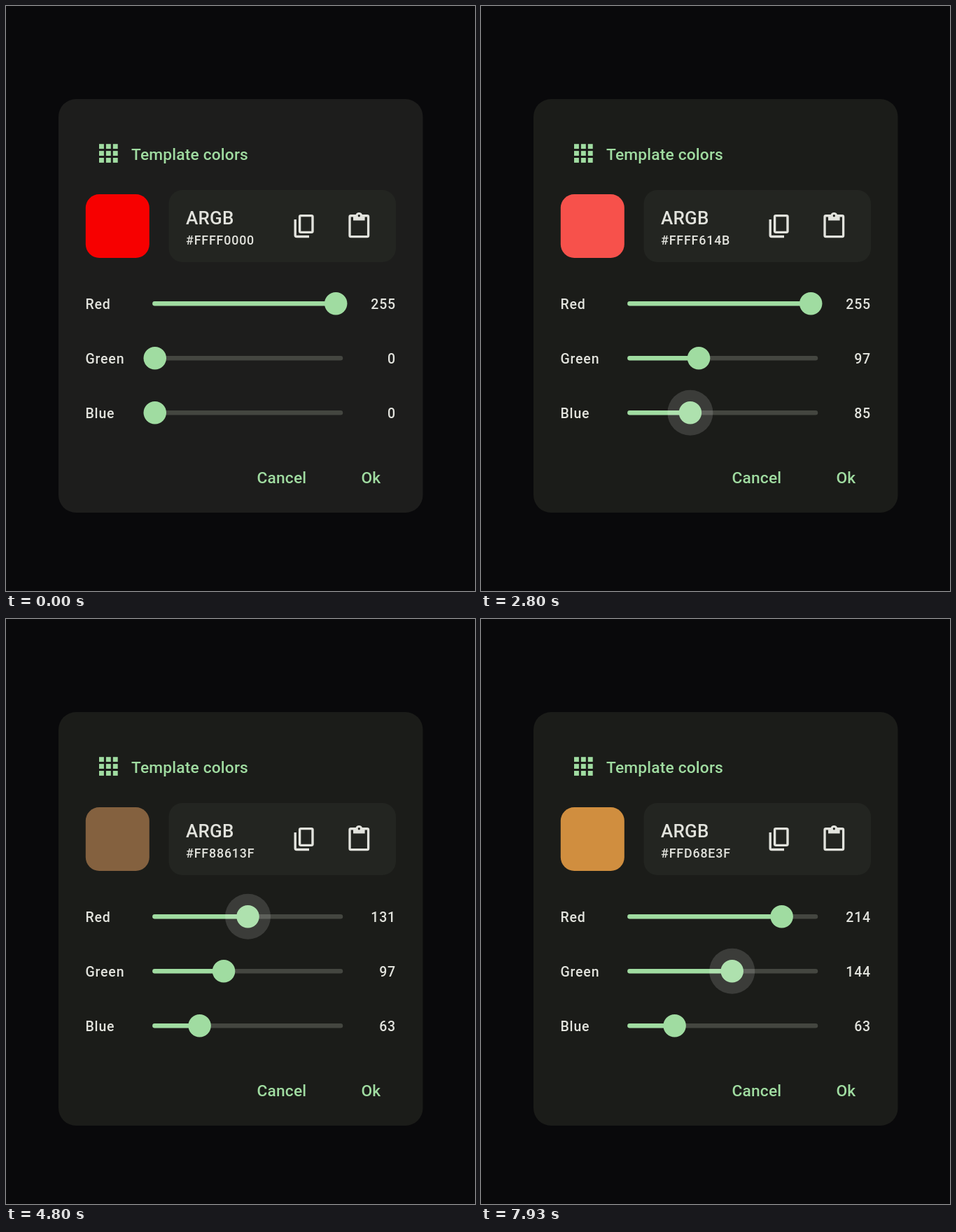
These frames come from a looping animation (670 px wide and 836 px high, 8 s). An HTML page:

```html
<!DOCTYPE html>
<html lang="en">
<head>
<meta charset="utf-8">
<title>Color picker</title>
<style>
  html, body { margin: 0; width: 100%; height: 100%; overflow: hidden; background: #09090b; }
  svg { display: block; width: 670px; height: 836px; }
  text { font: 500 19.5px Roboto, sans-serif; letter-spacing: .81px; fill: #e2e3dd; }
  .accent { fill: #a0dca1; }
  text.accent { font-size: 22.75px; letter-spacing: .16px; }
  .title { font-size: 26px; letter-spacing: .24px; }
  .hex { font-size: 17.875px; }
  .value { text-anchor: end; }
  .rail { fill: #444640; }
  .halo { fill: #fff; fill-opacity: .14; }
  .line { fill: none; stroke: #e2e3dd; stroke-width: 3.4; }
  #card { animation: settle 8s infinite; }
  @keyframes settle {
    0%, .8% { fill: #1d1d1c; }
    5%, 100% { fill: #1b1c19; }
  }
</style>
</head>
<body>
<svg id="stage" viewBox="0 0 670 836">
  <rect width="670" height="836" fill="#09090b"/>
  <rect id="card" x="75" y="133" width="520.5" height="591" rx="25"/>
  <g id="grid" class="accent"></g>
  <text class="accent" x="179" y="219.5">Template colors</text>

  <rect id="swatch" x="113.8" y="269" width="91" height="91" rx="19.5"/>
  <rect x="232.5" y="263" width="324.5" height="103" rx="19.5" fill="#232521"/>
  <text class="title" x="257" y="311.5">ARGB</text>
  <text class="hex" id="hex" x="257" y="341"></text>

  <g class="line">
    <rect x="419.6" y="299.6" width="18.4" height="23.8" rx="1.6"/>
    <path d="M413.2 305V327.4Q413.2 329.5 415.3 329.5H433"/>
  </g>
  <path fill="#e2e3dd" fill-rule="evenodd" transform="translate(484.4 294.8) scale(1.66)"
    d="M19 2h-4.2a3 3 0 0 0-5.6 0H5a2 2 0 0 0-2 2v16a2 2 0 0 0 2 2h14a2 2 0 0 0 2-2V4a2 2 0 0 0-2-2z
       M12 2a1 1 0 0 1 0 2a1 1 0 0 1 0-2z M19 20H5V4h2v3h10V4h2z"/>

  <g id="sliders"></g>
  <text class="accent" x="358.5" y="681.5">Cancel</text>
  <text class="accent" x="507.5" y="681.5">Ok</text>
</svg>
<script>
const LOOP = 8000, STEP = 1000 / 15, LABEL_LAG = 19;
const HALO_RADIUS = 32.5, HALO_TIME = 100;

const swing = p => Math.sin(p * Math.PI / 2) ** 2;
const settle = p => 1 - (1 - p) ** 1.5;

// keys: [time, value, easing into this key]; presses: [down, up]
const channels = [
  { name: 'Red', y: 425.2, presses: [[4470, 6010]],
    keys: [[0, 255], [4450, 255], [4466, 230], [5200, 65, settle], [5300, 65], [6060, 214]] },
  { name: 'Green', y: 503.2, presses: [[1180, 2160], [7100, 9000]],
    keys: [[0, 0], [1133, 0], [1920, 151.3], [2200, 97], [7667, 97], [7980, 147]] },
  { name: 'Blue', y: 581.2, presses: [[2580, 3560]],
    keys: [[0, 0], [2533, 0], [3130, 203], [3600, 63]] },
];

const byId = id => document.getElementById(id);
const clamp = v => Math.min(1, Math.max(0, v));

function add(parent, tag, attrs, content = '') {
  const node = document.createElementNS('http://www.w3.org/2000/svg', tag);
  for (const key in attrs) node.setAttribute(key, attrs[key]);
  node.textContent = content;
  return parent.appendChild(node);
}

function valueAt(keys, t) {
  const next = keys.findIndex(key => key[0] > t);
  if (next < 0) return keys[keys.length - 1][1];
  if (next === 0) return keys[0][1];
  const [t0, v0] = keys[next - 1], [t1, v1, ease = swing] = keys[next];
  return v0 + (v1 - v0) * ease((t - t0) / (t1 - t0));
}

const haloAt = (presses, t) => Math.max(...presses.map(([down, up]) =>
  Math.min(clamp((t - down) / HALO_TIME), 1 - clamp((t - up) / HALO_TIME))));

for (let i = 0; i < 9; i++) {
  add(byId('grid'), 'rect', {
    x: 133 + i % 3 * 9.9, y: 197.2 + Math.floor(i / 3) * 9.9, width: 6.9, height: 6.9 });
}

for (const c of channels) {
  const g = byId('sliders'), bar = { x: 209.2, y: c.y - 3.25, height: 6.5, rx: 3.25 };
  add(g, 'text', { x: 113.5, y: c.y + 8.2 }, c.name);
  add(g, 'rect', { ...bar, width: 272, class: 'rail' });
  c.fill = add(g, 'rect', { ...bar, class: 'accent' });
  c.thumb = add(g, 'circle', { cy: c.y, r: 16.25, class: 'accent' });
  c.halo = add(g, 'circle', { cy: c.y, class: 'halo' });
  c.value = add(g, 'text', { x: 557, y: c.y + 8.2, class: 'value' });
}

function render(t) {
  for (const c of channels) {
    const value = Math.round(valueAt(c.keys, t));
    const x = 212.75 + 1.0135 * value;
    c.fill.setAttribute('width', x - 209.2);
    c.thumb.setAttribute('cx', x);
    c.halo.setAttribute('cx', x);
    c.halo.setAttribute('r', HALO_RADIUS * haloAt(c.presses, t));
    c.value.textContent = value;
  }
  const [r, g, b] = channels.map(c => Math.round(valueAt(c.keys, Math.max(0, t - LABEL_LAG))));
  byId('hex').textContent = '#FF' +
    [r, g, b].map(v => v.toString(16).padStart(2, '0').toUpperCase()).join('');
  // Strong reds are shown slightly muted
  const green = Math.max(0, g - 0.2 * Math.max(0, r - g - 80));
  byId('swatch').setAttribute('fill', `rgb(${Math.round(r * .97)},${Math.round(green)},${b})`);
}

const start = performance.now();
function tick() {
  const t = (performance.now() - start) % LOOP;
  render(Math.floor((t + 4) / STEP) * STEP % LOOP);
  requestAnimationFrame(tick);
}
tick();
</script>
</body>
</html>
```
